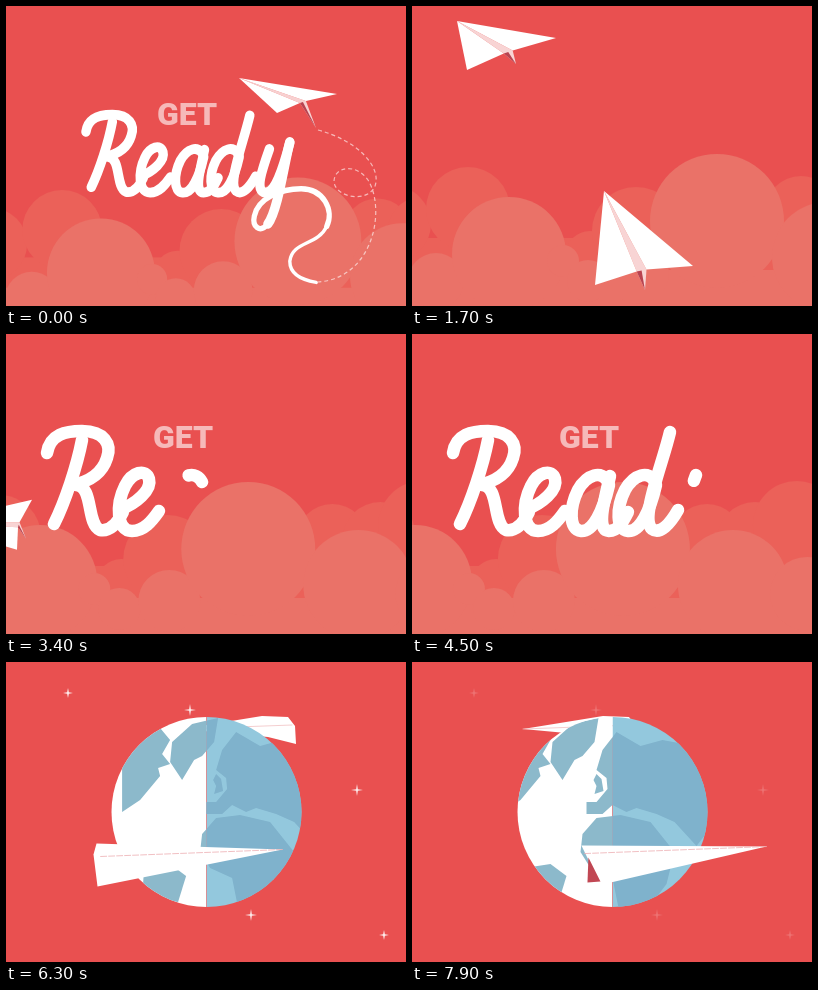
An HTML page with a canvas for the animation above (8 s loop, 400 px wide and 300 px high).

```html
<!DOCTYPE html>
<html lang="en">
<head>
<meta charset="utf-8">
<title>Get Ready</title>
<style>
html, body { margin: 0; width: 100%; height: 100%; overflow: hidden; background: #e95050; }
canvas { display: block; width: 400px; height: 300px; }
</style>
</head>
<body>
<canvas id="stage"></canvas>
<script>
(() => {
const canvas = document.getElementById('stage');
const ctx = canvas.getContext('2d');
const dpr = window.devicePixelRatio || 1;
canvas.width = 400 * dpr;
canvas.height = 300 * dpr;

const LOOP = 8000, STEP = 100;
const RED = '#e95050', MID = '#eb6159', FRONT = '#ea7268';

const clamp = v => Math.max(0, Math.min(1, v));
const span = (t, a, b) => clamp((t - a) / (b - a));
const smooth = v => v * v * (3 - 2 * v);
const mix = (a, b, k) => a + (b - a) * k;
const mixAll = (a, b, k) => a.map((v, i) => mix(v, b[i], k));
const move = (p, dx, dy) => p.map((v, i) => v + (i % 2 ? dy : dx));
const rgb = c => `rgb(${c.map(Math.round).join(',')})`;

function poly(pts, fill) {
  ctx.beginPath();
  for (let i = 0; i < pts.length; i += 2) ctx.lineTo(pts[i], pts[i + 1]);
  ctx.closePath();
  ctx.fillStyle = fill;
  ctx.fill();
}

function at(x, y, sx, sy, paint) {
  ctx.save();
  ctx.translate(x, y);
  ctx.scale(sx, sy);
  paint();
  ctx.restore();
}

// Cloud puffs: x, y, radius
const midPuffs = [
  [-58, 218, 38], [17, 203, 42], [139, 250, 25], [185, 225, 44],
  [350, 206, 36], [398, 206, 38], [440, 191, 44]
];
const frontPuffs = [
  [-72, 262, 27], [-15, 275, 28], [58, 248, 57], [112, 255, 16],
  [137, 275, 21], [187, 267, 31], [266, 215, 67], [376, 251, 55], [450, 260, 37]
];

function drawClouds(drift) {
  const layer = (puffs, floor, color) => {
    ctx.fillStyle = color;
    ctx.fillRect(-100, floor, 700, 400);
    for (const [x, y, r] of puffs) {
      ctx.beginPath();
      ctx.arc(x + drift, y, r, 0, 7);
      ctx.fill();
    }
  };
  layer(midPuffs, 232, MID);
  layer(frontPuffs, 264, FRONT);
}

// The drift slows gently
const driftAt = s => {
  const u = s - 2.7;
  return -36 * u + 3 * u * u;
};

// Lettering, written stroke after stroke
const bowl = (x, y) => `M${x} ${y}c-6 -12 -21 -8 -30 8c-9 18 -9 40 3 41c12 1 22 -20 28 -46`;
const strokes = [
  ['M76 106C71 132 59 168 48 190'],
  ['M41 119C44 100 60 97 76 97C98 97 106 110 101 124C96 140 82 148 66 151'],
  ['M70 151C88 152 80 190 94 196C105 198 112 188 117 178'],
  ['M113 176C130 170 146 156 143 145C140 134 126 138 119 152C110 170 110 197 126 197C138 197 146 187 153 177'],
  [bowl(196, 148)],
  ['M198 142C192 168 184 196 197 197C206 197 211 188 216 178'],
  [bowl(243, 148)],
  ['M258 98C250 132 228 184 240 195C248 201 258 190 266 176'],
  ['M284 141C274 168 264 196 279 197C293 196 303 162 311 133'],
  ['M311 132C303 163 295 220 282 237'],
  ['M282 237C271 250 261 240 264 227C269 204 299 192 326 192C356 192 370 220 360 240', 7],
  ['M360 240C348 265 314 259 311 285C311 301 327 309 346 312', 4.5]
].map(([d, width = 12.5]) => {
  const el = document.createElementNS('http://www.w3.org/2000/svg', 'path');
  el.setAttribute('d', d);
  return { path: new Path2D(d), len: el.getTotalLength(), width };
});

function drawWord(pen) {
  ctx.strokeStyle = '#fff';
  ctx.lineCap = ctx.lineJoin = 'round';
  for (const { path, len, width } of strokes) {
    if (pen <= 0) break;
    ctx.lineWidth = width;
    ctx.setLineDash(pen < len ? [pen, len * 2] : []);
    ctx.stroke(path);
    pen -= len;
  }
  ctx.setLineDash([]);
}

// The last flourish is quicker
const penAt = s => 454 * (s - 2.31) + 900 * Math.max(0, s - 4.5);

function drawGet(x, y) {
  ctx.fillStyle = 'rgba(255,255,255,.6)';
  ctx.font = '900 32px Roboto, sans-serif';
  ctx.fillText('GET', x, y);
}

// A plane is nose, left wing, right wing, keel; the fold lines follow from these
function drawPlane(p, fold = '#f8d0d0') {
  const [nx, ny, lx, ly, rx, ry, kx, ky] = p;
  const mx = (lx + rx) / 2, my = (ly + ry) / 2;
  const cx = mix(nx, mx, .94), cy = mix(ny, my, .94);
  const dx = (lx - mx) * .1, dy = (ly - my) * .1;
  poly([nx, ny, cx + dx, cy + dy, kx, ky, cx - dx, cy - dy], fold);
  poly([cx + dx, cy + dy, kx, ky, cx, cy], '#b94350');
  poly([nx, ny, lx, ly, cx + dx, cy + dy], '#fff');
  poly([nx, ny, cx - dx, cy - dy, rx, ry], '#fff');
}

const rising = [264, 122, 208, 184, 316, 168, 262, 188];
const leaving = [45, 15, 55, 64, 144, 32, 104, 58];
const climbing = [192, 185, 183, 279, 281, 260, 233, 284];
const passing = [173, 11, 130, 85, 232, 118, 180, 116];
const crossing = [203, 216, 291, 242, 306, 192, 300, 231];

const flights = [
  [[.1, move(rising, 60, 190)], [.9, rising], [1.7, leaving], [2.3, move(leaving, -160, -80)]],
  [[1.3, move(climbing, 15, 125)], [1.7, climbing], [2.7, passing], [3.4, move(passing, 0, -130)]],
  [[2.1, move(crossing, 210, 20)], [2.7, crossing], [3.5, move(crossing, -320, -30)]]
];

function drawFlight(keys, s) {
  const i = keys.findIndex(([t]) => t > s);
  if (i < 1) return;
  const [a, from] = keys[i - 1], [b, to] = keys[i];
  const fold = rgb(mixAll([217, 154, 156], [248, 212, 212], span(s, .9, 1.6)));
  drawPlane(mixAll(from, to, span(s, a, b)), fold);
}

function drawPoster() {
  at(40, 31, .947, .95, () => drawClouds(0));
  drawGet(151, 119);
  at(49, 33, .755, .78, () => drawWord(Infinity));
  ctx.strokeStyle = 'rgba(255,255,255,.6)';
  ctx.lineWidth = 1.2;
  ctx.lineCap = 'butt';
  ctx.setLineDash([4, 3]);
  ctx.stroke(new Path2D('M312 124C350 134 376 160 369 180C362 197 330 192 328 176C328 160 350 157 362 174C380 203 368 272 312 276'));
  ctx.setLineDash([]);
  drawPlane([233, 72, 271, 107, 331, 88, 310, 122]);
}

// Globe: Canada, Greenland, Britain, Eurasia, Africa, South America
const lands = [
  'M90 72L128 66L138 78L130 92L138 102L126 106L128 114L108 138L90 150Z',
  'M150 118L138 100L140 80L160 62L186 56L182 80L170 94L162 98Z',
  'M184 112l5 5l2 12l-9 3l2 -8l-3 -6z',
  'M174 152V140H184L195 127L194 116L184 108L190 88L204 70L228 84L250 78L340 95V168L298 166L284 184L262 160L244 152L224 146L214 150L200 143L190 152Z',
  'M170 172L184 156L208 153L238 160L262 190L254 222L236 246H206L200 216L178 206L168 190Z',
  'M112 206L138 202L154 214L146 240L110 236Z'
].map(d => new Path2D(d));

function drawHalf(x, sea, land, shift) {
  ctx.save();
  ctx.beginPath();
  ctx.rect(x, 50, 100, 200);
  ctx.clip();
  ctx.fillStyle = sea;
  ctx.fillRect(x, 50, 100, 200);
  ctx.translate(shift, 0);
  ctx.fillStyle = land;
  lands.forEach(p => ctx.fill(p));
  ctx.restore();
}

function drawGlobe(s) {
  const k = 1 - (1 - span(s, 4.9, 5.4)) ** 3;
  if (!k) return;
  at(200.5, 150, k, k, () => {
    ctx.beginPath();
    ctx.arc(0, 0, 95, 0, 7);
    ctx.clip();
    ctx.translate(-200, -150);
    const shift = 16 * (7.9 - s);
    drawHalf(100, '#fff', '#8cb9cb', shift);
    drawHalf(200, '#93c8dd', '#7fb2cc', shift);
  });
}

const stars = [[62, 31, 5], [184, 48, 6], [351, 128, 6], [245, 253, 6], [378, 273, 5]];
function drawStars(s) {
  ctx.globalAlpha = span(s, 5.2, 5.5) * (.55 + .35 * Math.cos((s - 6.3) * Math.PI / 1.6));
  for (const [x, y, size] of stars) {
    const pts = [];
    for (let i = 0; i < 8; i++) {
      const r = i % 2 ? 1.2 : size, a = i * Math.PI / 4;
      pts.push(x + r * Math.cos(a), y + r * Math.sin(a));
    }
    poly(pts, '#fff');
  }
  ctx.globalAlpha = 1;
}

const LAP = 1.42;
const lap = (s, start) => ((s - start) % LAP) / LAP;

function drawFarPlane(s) {
  if (s < 5.68) return;
  const x = 400 - 513 * lap(s, 5.68), y = 67;
  poly(move([0, 0, 80, -13, 106, -12, 113, -3, 114, 15, 86, 8], x, y), '#fff');
  ctx.strokeStyle = '#f0b9bb';
  ctx.lineWidth = .7;
  ctx.stroke(new Path2D(`M${x} ${y}l110 -4`));
}

function drawNearPlane(s) {
  if (s < 5.62) return;
  const x = -18 + 615 * lap(s, 5.62), k = span(x, 277, 356);
  const y = 187.5 - 3 * k;
  const tail = mixAll([-186, -6, -189, 5, -185, 37], [-185, -1, -179, 11, -164, 38], k);
  poly(move([0, 0, ...tail], x, y), '#fff');
  ctx.globalAlpha = k;
  poly(move([-178, 11, -179, 36, -166, 35], x, y), '#c04350');
  ctx.globalAlpha = 1;
  ctx.strokeStyle = '#eeb0b4';
  ctx.lineWidth = .8;
  ctx.setLineDash([6, 2]);
  ctx.stroke(new Path2D(`M${x} ${y}l-182 7`));
  ctx.setLineDash([]);
}

function drawSky(s) {
  const alpha = 1 - span(s, 4.9, 5.2);
  const fall = smooth(span(s, 4.75, 5.4));
  if (fall < 1) at(0, 175 * fall, 1, 1, () => drawClouds(driftAt(s)));
  ctx.globalAlpha = alpha * span(s, 2.2, 2.6);
  drawGet(147, 114);
  ctx.globalAlpha = alpha;
  drawWord(penAt(s));
  ctx.globalAlpha = 1;
  flights.forEach(f => drawFlight(f, s));
}

function draw(s) {
  ctx.setTransform(dpr, 0, 0, dpr, 0, 0);
  ctx.fillStyle = RED;
  ctx.fillRect(0, 0, 400, 300);
  if (s < .1) return drawPoster();
  drawSky(s);
  drawStars(s);
  drawFarPlane(s);
  drawGlobe(s);
  drawNearPlane(s);
}

const began = performance.now();
function tick() {
  const t = Math.max(0, performance.now() - began) % LOOP;
  draw(Math.floor(t / STEP) * STEP / 1000);
  requestAnimationFrame(tick);
}
tick();
})();
</script>
</body>
</html>
```
